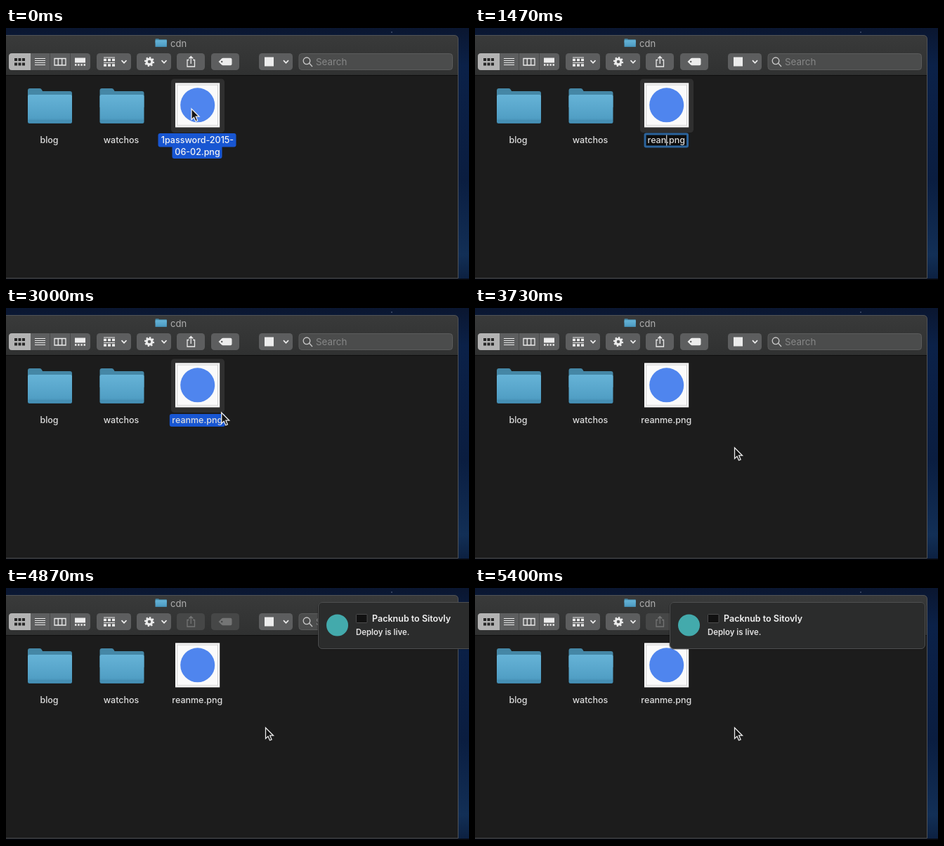
An HTML page for the animation above (5540 ms loop, 659 by 359 pixels).

```html
<!DOCTYPE html>
<html lang="en">
<head>
<meta charset="utf-8">
<title>Renaming a file</title>
<style>
  html, body { margin: 0; width: 100%; height: 100%; overflow: hidden; background: #0b1428; }
  svg { display: block; font: 500 12.5px Inter, sans-serif; fill: #dcdcdc; }
  .mid { text-anchor: middle; }
  .btn { fill: #5d5e5f; }
  .ico { fill: #ececec; }
  .line { fill: none; stroke: #ececec; stroke-width: 1.3; }
  .blue { fill: #1856d2; }
  .dim .btn { fill: #464747; }
  .dim .ico { fill: #747575; }
  .dim .line { stroke: #747575; }
</style>
</head>
<body>
<svg width="659" height="359" viewBox="0 0 659 359">
  <defs>
    <linearGradient id="sky" x2="0" y2="1">
      <stop stop-color="#0a1630"/><stop offset=".15" stop-color="#0b2148"/>
      <stop offset=".6" stop-color="#0a1d40"/><stop offset=".9" stop-color="#122f56"/><stop offset="1" stop-color="#0c2040"/>
    </linearGradient>
    <linearGradient id="bar" x2="0" y2="1">
      <stop stop-color="#393a3a"/><stop offset="1" stop-color="#303131"/>
    </linearGradient>
    <linearGradient id="front" x2="0" y2="1">
      <stop stop-color="#66b3d7"/><stop offset=".8" stop-color="#519fc5"/><stop offset="1" stop-color="#4189ae"/>
    </linearGradient>
    <g id="folder">
      <path d="M0 4q0-3 3-3h14q2 0 3 2l1 2h39q3 0 3 3v20H0z" fill="#4587a6"/>
      <rect y="10" width="63" height="41" rx="2.5" fill="url(#front)"/>
      <path d="M.5 46.500h62" stroke="#438bae" stroke-width=".8"/>
    </g>
    <path id="chevron" class="line" style="stroke-width:1.7" d="M-3.5-1.8L0 1.8l3.5-3.6"/>
  </defs>

  <rect width="659" height="359" fill="url(#sky)"/>
  <circle cx="549" cy="6" r="1" fill="#44506c"/>

  <!-- window -->
  <path d="M-5 10.500H638q5.500 0 5.500 5.500V357H-5z" fill="#1c1c1c"/>
  <path d="M-5 10.500H638q5.500 0 5.500 5.500V67H-5z" fill="url(#bar)"/>
  <path d="M0 67.500H643" stroke="#0e0e0e"/>
  <path d="M-5 10.500H638q5.500 0 5.500 5.500V356.500H-5" fill="none" stroke="#505256"/>
  <rect y="357" width="659" height="2" fill="#07090f"/>
  <use href="#folder" transform="translate(212.500 15) scale(.26 .235)"/>
  <text x="234" y="26.500" font-size="13" font-weight="400" fill="#b0b0b0">cdn</text>

  <!-- toolbar -->
  <rect class="btn" x="4" y="36" width="116" height="24" rx="4.500"/>
  <path d="M35 36H8.500Q4 36 4 40.500v15Q4 60 8.500 60H35z" fill="#b3b3b3"/>
  <path d="M62.500 36v24M91.500 36v24" stroke="#484949"/>
  <path d="M12 45h15M12 51.500h15" stroke="#272727" stroke-width="4" stroke-dasharray="4 1.500"/>
  <path class="line" style="stroke-width:1" d="M41 43.500h15m-15 3h15m-15 3h15m-15 3h15"/>
  <path class="line" d="M69 43.500h16v9.500H69zM74.300 43v10m5.400-10v10"/>
  <path class="ico" d="M98 42.500h15v7H98z"/>
  <path class="line" style="stroke-width:2.500" d="M98 52.500h15" stroke-dasharray="2.500 1.660"/>

  <rect class="btn" x="129" y="36" width="49" height="24" rx="4.500"/>
  <path class="line" style="stroke-width:1" d="M139 42h16m-16 7.500h16"/>
  <path class="line" style="stroke-width:3.600" d="M139 45.500h16m-16 7.500h16" stroke-dasharray="4 2"/>
  <use href="#chevron" x="168" y="48"/>

  <rect class="btn" x="186" y="36" width="49" height="24" rx="4.500"/>
  <circle class="line" cx="204" cy="48" r="3.900" style="stroke-width:3.200"/>
  <circle class="line" cx="204" cy="48" r="6" style="stroke-width:2.200" pathLength="16" stroke-dasharray="1 1"/>
  <use href="#chevron" x="225" y="48"/>

  <g id="actions">
    <rect class="btn" x="243" y="36" width="40" height="24" rx="4.500"/>
    <path class="line" d="M260.500 45.500H258v9.500h10.500v-9.500H266M263.250 51V40.500m-3 3l3-3 3 3"/>
    <rect class="btn" x="292" y="36" width="40" height="24" rx="4.500"/>
    <path class="ico" fill-rule="evenodd" d="M302.500 48l4.500-4.500q.8-.7 2-.7h10.500q2 0 2 2v6.400q0 2-2 2H309q-1.200 0-2-.7zM306 48a1.200 1.200 0 1 0 2.400 0a1.200 1.200 0 1 0-2.400 0"/>
  </g>

  <rect class="btn" x="360" y="36" width="48" height="24" rx="4.500"/>
  <rect class="ico" x="368" y="41.500" width="13" height="13"/>
  <use href="#chevron" x="398.500" y="48"/>

  <rect x="417" y="36.500" width="218.500" height="23" rx="4" fill="#4b4c4c" stroke="#5a5b5b"/>
  <path class="line" style="stroke:#c9c9c9" d="M432 50.500l4 4.500"/>
  <circle class="line" style="stroke:#c9c9c9" cx="428" cy="46.800" r="4.800"/>
  <text x="441" y="52.700" font-size="13.400" font-weight="400" fill="#868787">Search</text>

  <!-- files -->
  <use href="#folder" x="31" y="85"/>
  <use href="#folder" x="133.500" y="85"/>
  <text class="mid" x="61.500" y="164.300">blog</text>
  <text class="mid" x="164" y="164.300">watchos</text>

  <rect id="halo" x="235" y="72.500" width="76" height="76.500" rx="4.500" fill="#2f2f2f"/>
  <rect x="241" y="78.300" width="63.200" height="63.200" fill="#fafafa"/>
  <rect x="243.700" y="81" width="57.800" height="57.800" fill="none" stroke="#d0d0d0"/>
  <circle cx="272.700" cy="109.800" r="24.500" fill="#4f85ee"/>

  <g id="longSelected" class="blue">
    <rect x="216.500" y="150" width="111" height="19.500" rx="3"/>
    <rect x="236.500" y="166" width="71" height="20" rx="3"/>
  </g>
  <g id="longField">
    <rect x="218" y="150" width="110" height="35.500" rx="2" fill="#0d0d0d" stroke="#2c649c" stroke-width="3"/>
    <path d="M219.500 151.500H326.500V168H278.500V184H219.500z" fill="#3d6394"/>
  </g>
  <g id="longName" class="mid" fill="#f4f4f4">
    <text x="272.500" y="164.300">1password-2015-</text>
    <text id="secondLine" x="272.500">06-02.png</text>
  </g>
  <g id="shortName">
    <rect id="plate" y="151" height="18"/>
    <text id="label" class="mid" x="272.300" y="164.300"></text>
    <rect id="caret" y="152.500" width="1" height="15" fill="#fff"/>
  </g>

  <!-- notification -->
  <g id="note">
    <rect x="-1" y="20" width="366" height="68" rx="7" fill="#000" opacity=".25"/>
    <rect x=".5" y="20.500" width="363" height="66" rx="5.500" fill="#2b2c2c" stroke="#4e4f50"/>
    <circle cx="27.500" cy="53" r="15.500" fill="#43aaac"/>
    <rect x="54.500" y="37.500" width="15.500" height="12" rx="1" fill="#111" stroke="#58585a" stroke-width=".8"/>
    <text x="77" y="48" font-weight="600" fill="#f0f0f0">Packnub to Sitovly</text>
    <text x="54" y="66.800" font-size="11.400" font-weight="600" fill="#e2e2e2">Deploy is live.</text>
  </g>

  <path id="cursor" d="M0 0v15.500l3.500-3.200L6 18l2.600-1.100-2.400-5.700H11z" fill="#141414" stroke="#ececec" stroke-width="1.300"/>
</svg>
<script>
const LOOP = 5540, FPS = 15;
const EDIT = 8, KEYS = [17, 18, 20, 21, 24, 26], RETURN = 31;
const MOVE = 43, MOVED = 49, DESELECT = 53, DISABLE = 62, SLIDE = 70, SLID = 79;
const NAME = 'reanme';

const $ = id => document.getElementById(id);
const show = (id, on) => $(id).style.display = on ? '' : 'none';
const set = (id, attrs) => {
  for (const key in attrs) $(id).setAttribute(key, attrs[key]);
};
const place = (id, x, y) => set(id, { transform: `translate(${x} ${y})` });
const easeOut = (k, from, to, power) =>
  1 - (1 - Math.min(1, Math.max(0, (k - from) / (to - from)))) ** power;

function drawName(k) {
  const typed = KEYS.filter(key => key <= k).length;
  const renaming = typed > 0;
  show('longSelected', k < EDIT);
  show('longField', k >= EDIT && !renaming);
  show('longName', !renaming);
  show('shortName', renaming);
  set('secondLine', { y: k < EDIT ? 181.3 : 180.3 });
  if (!renaming) return;

  const editing = k < RETURN, label = $('label');
  label.textContent = NAME.slice(0, typed) + '.png';
  const width = label.getComputedTextLength(), left = 272.3 - width / 2;
  set('plate', {
    x: left - 3.5, width: width + 7, rx: editing ? 1.5 : 3,
    fill: editing ? '#0d0d0d' : k < DESELECT ? '#1856d2' : 'none',
    stroke: editing ? '#2c649c' : 'none', 'stroke-width': 3
  });
  show('caret', editing);
  set('caret', { x: left + label.getSubStringLength(0, typed) });
}

function draw(ms) {
  const k = Math.floor((ms % LOOP + 5) * FPS / 1000);
  drawName(k);
  show('halo', k < DESELECT);
  $('actions').classList.toggle('dim', k >= DISABLE);

  const moved = easeOut(k, MOVE, MOVED, 1.28);
  show('cursor', k < KEYS[0] || k > MOVE);
  place('cursor', 264 + 105.5 * moved, 115 + 84 * moved);

  show('note', k > SLIDE);
  place('note', 659 - 382 * easeOut(k, SLIDE, SLID, 2.04), 0);
}

const start = performance.now();
(function loop() {
  draw(performance.now() - start);
  requestAnimationFrame(loop);
})();
</script>
</body>
</html>
```
